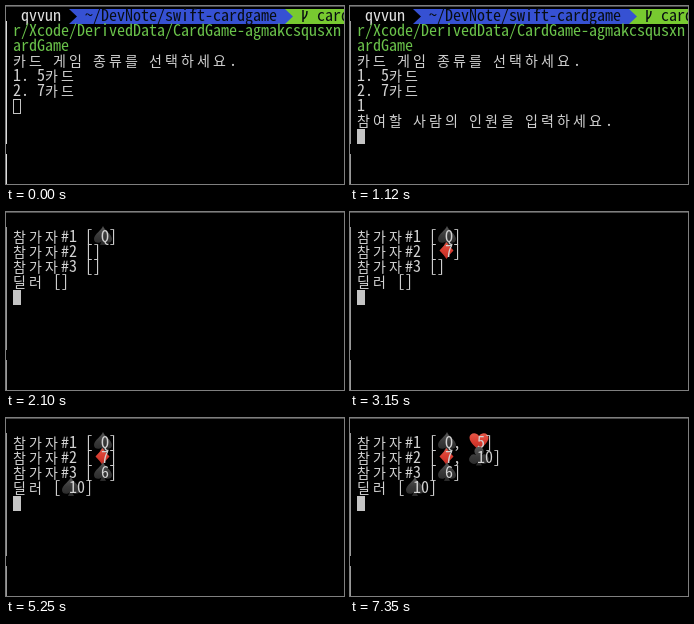
Write an HTML page with a canvas that moves like this. It is 338 by 178 pixels and loops after 8 s.

```html
<!DOCTYPE html>
<html lang="ko">
<head>
<meta charset="utf-8">
<title>Card game terminal</title>
<style>
html, body { margin: 0; width: 100%; height: 100%; overflow: hidden; background: #000; }
canvas { display: block; width: 338px; height: 178px; }
</style>
</head>
<body>
<canvas id="stage"></canvas>
<script>
const W = 338, H = 178, LOOP = 8000, FOCUS = 70;
const LEFT = 7, TOP = 3, CELL = 8, ROW = 15, BASELINE = 11.5;
const MONO = '"Noto Sans Mono CJK KR", "Noto Sans Mono CJK JP", "Noto Sans Mono", monospace';
const HANGUL = '14px "Noto Sans CJK KR", "Noto Sans CJK", "Noto Sans CJK JP", sans-serif';
const COLOR = {
  text: '#d2d2d2', path: '#6ac24a', blue: '#3651d3', green: '#78ca30',
  ink: '#080d12', cursor: '#c4c4c4', edge: '#999', edgeIdle: '#ddd', top: '#4a4a4a'
};

const canvas = document.getElementById('stage');
const scale = window.devicePixelRatio || 1;
canvas.width = W * scale;
canvas.height = H * scale;
const ctx = canvas.getContext('2d');

// Pick the font size whose advance is one cell
ctx.font = `100px ${MONO}`;
const LATIN = `${100 * CELL / ctx.measureText('0').width}px ${MONO}`;

const colX = col => LEFT + col * CELL;
const rowY = row => TOP + row * ROW;
const isWide = ch => ch >= '가' && ch <= '힣';
const isSuit = ch => '♠♥♦♣'.includes(ch);

// Suit outlines in a 20 × 19 box
const SUITS = {
  '♠': new Path2D('M10 0C11 4 19 8 19 13C19 17 14 18 11.4 15.5L13 19H7L8.6 15.5C6 18 1 17 1 13C1 8 9 4 10 0Z'),
  '♥': new Path2D('M10 18.5C7 15 .5 11 .5 5.5C.5 .5 7.5 -.5 10 4C12.5 -.5 19.5 .5 19.5 5.5C19.5 11 13 15 10 18.5Z'),
  '♦': new Path2D('M9.5 1Q12 5 16.5 9.5Q12 14 9.5 18Q7 14 2.5 9.5Q7 5 9.5 1Z'),
  '♣': new Path2D('M7.2 8A4.6 4.6 0 1 1 12.8 8A4.7 4.7 0 1 1 11.3 15L13 18.5H7L8.7 15A4.7 4.7 0 1 1 7.2 8Z')
};

function drawSuit(ch, x, y) {
  const red = ch === '♥' || ch === '♦';
  const shade = ctx.createLinearGradient(0, 0, 0, 19);
  shade.addColorStop(0, red ? '#e65b4b' : '#5a5a5a');
  shade.addColorStop(0.5, red ? '#d83c30' : '#393939');
  shade.addColorStop(1, red ? '#b92a22' : '#292929');
  ctx.save();
  ctx.translate(x, y);
  ctx.fillStyle = shade;
  ctx.fill(SUITS[ch]);
  ctx.restore();
}

function drawText(text, row, color = COLOR.text, col = 0) {
  const glyphs = [];
  for (const ch of text) {
    const x = colX(col);
    if (isSuit(ch)) drawSuit(ch, x, rowY(row) - 4);
    else glyphs.push([ch, x]);
    col += isWide(ch) ? 2 : 1;
  }
  ctx.fillStyle = color;
  for (const [ch, x] of glyphs) {
    ctx.font = isWide(ch) ? HANGUL : LATIN;
    ctx.fillText(ch, x, rowY(row) + BASELINE);
  }
}

function drawCursor(col, row, hollow) {
  const x = colX(col), y = rowY(row);
  ctx.fillStyle = ctx.strokeStyle = COLOR.cursor;
  ctx.lineWidth = 1;
  if (hollow) ctx.strokeRect(x + 0.5, y + 0.5, CELL - 1, ROW - 1);
  else ctx.fillRect(x, y, CELL, ROW);
}

function drawArrow(x, color) {
  ctx.fillStyle = color;
  ctx.beginPath();
  ctx.moveTo(x, TOP);
  ctx.lineTo(x + CELL, TOP + ROW / 2);
  ctx.lineTo(x, TOP + ROW);
  ctx.fill();
}

function drawBranch(x) {
  ctx.strokeStyle = COLOR.ink;
  ctx.lineWidth = 1.5;
  ctx.stroke(new Path2D(`M${x + 2} 4V16M${x + 2} 13Q${x + 6} 11 ${x + 6} 5`));
}

function drawPrompt() {
  const blueX = colX(7), greenX = colX(34);
  ctx.fillStyle = COLOR.blue;
  ctx.fillRect(blueX, TOP, greenX - blueX, ROW);
  ctx.fillStyle = COLOR.green;
  ctx.fillRect(greenX, TOP, W - greenX, ROW);
  drawArrow(blueX, '#000');
  drawArrow(greenX, COLOR.blue);
  drawText('qvvun', 0, '#e2e2e2', 1);
  drawText('~/DevNote/swift-cardgame', 0, COLOR.ink, 9);
  drawBranch(colX(36));
  drawText('card', 0, COLOR.ink, 38);
}

function drawSetup(t) {
  drawPrompt();
  drawText('r/Xcode/DerivedData/CardGame-agmakcsqusxnl', 1, COLOR.path);
  drawText('ardGame', 2, COLOR.path);
  drawText('카드 게임 종류를 선택하세요.', 3);
  drawText('1. 5카드', 4);
  drawText('2. 7카드', 5);
  if (t >= 700) drawText('1', 6);
  if (t < 980) {
    drawCursor(t >= 700 ? 1 : 0, 6, t < FOCUS);
    return;
  }
  drawText('참여할 사람의 인원을 입력하세요.', 7);
  if (t >= 1610) drawText('3', 8);
  drawCursor(t >= 1610 ? 1 : 0, 8);
}

const HANDS = [
  ['참가자#1', [2100, '♠Q'], [6300, '♥5']],
  ['참가자#2', [3150, '♦7'], [7350, '♣10']],
  ['참가자#3', [4200, '♠6']],
  ['딜러', [5250, '♠10']]
];

function drawTable(t) {
  HANDS.forEach(([name, ...deals], i) => {
    const cards = deals.filter(([at]) => t >= at).map(([, card]) => card);
    drawText(`${name} [${cards.join(', ')}]`, i + 1);
  });
  drawCursor(0, 5);
}

function drawEdges(t) {
  ctx.fillStyle = COLOR.top;
  ctx.fillRect(0, 0, W, 1);
  ctx.fillStyle = t < FOCUS ? COLOR.edgeIdle : COLOR.edge;
  ctx.fillRect(0, 15, 1, 123);
  ctx.fillRect(0, 148, 1, 30);
}

function render(now) {
  const t = now % LOOP;
  ctx.setTransform(scale, 0, 0, scale, 0, 0);
  ctx.fillStyle = '#000';
  ctx.fillRect(0, 0, W, H);
  if (t < 2100) drawSetup(t);
  else drawTable(t);
  drawEdges(t);
}

const start = performance.now();
function tick() {
  render(performance.now() - start);
  requestAnimationFrame(tick);
}
tick();
</script>
</body>
</html>
```
